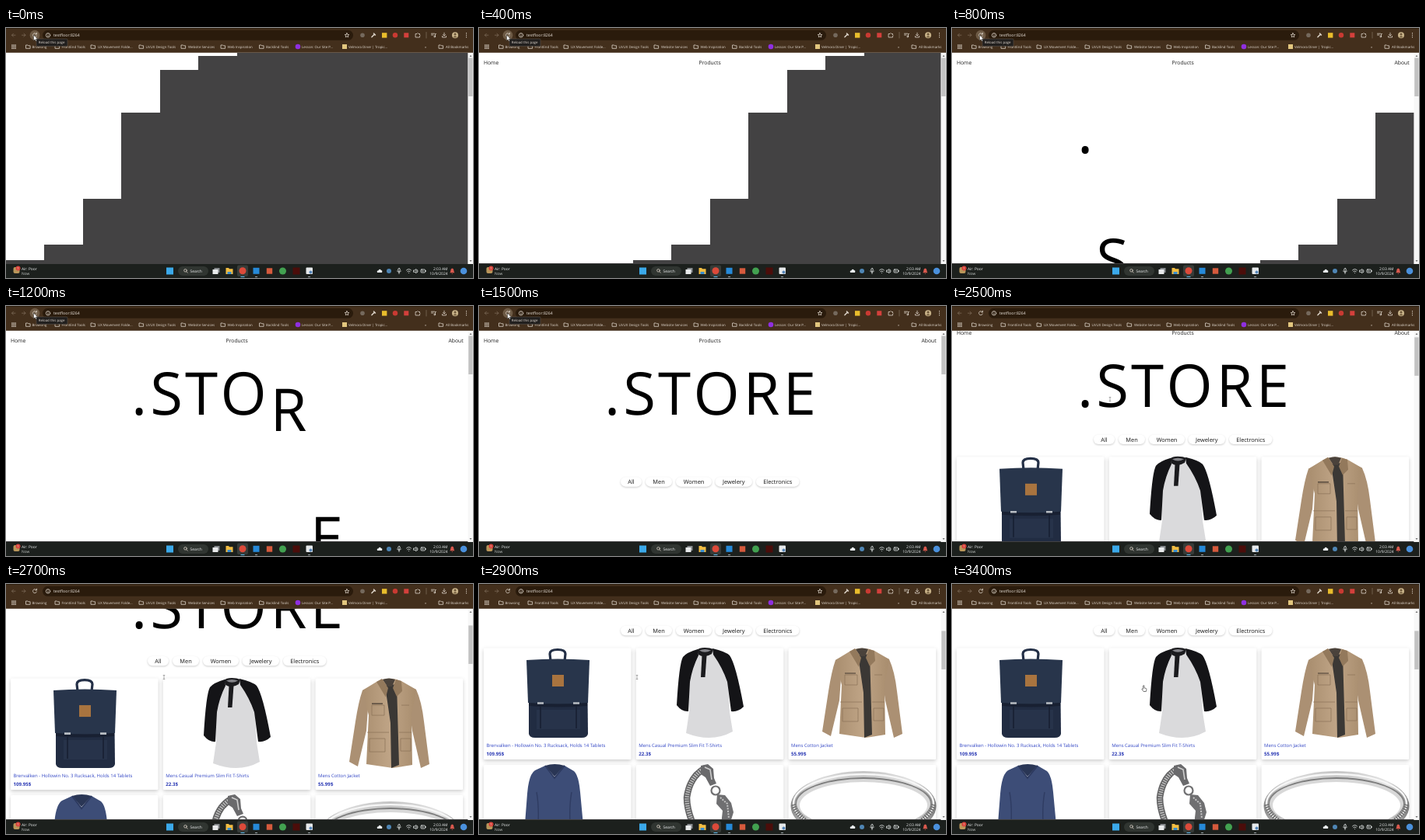
Recreate the animation shown at these times as an HTML page. Size 600x322 px, loop 3500 ms.

```html
<!DOCTYPE html>
<html lang="en">
<head>
<meta charset="utf-8">
<title>Store intro</title>
<style>
html, body { margin: 0; width: 100%; height: 100%; overflow: hidden; background: #fff; }
svg { display: block; width: 600px; height: 322px; }
text { font-family: "Open Sans", "Noto Sans", sans-serif; text-rendering: geometricPrecision; }
.line { fill: none; stroke: #dcd3c8; stroke-width: .8; stroke-linecap: round; stroke-linejoin: round; }
.dim { stroke: #7d6b58; }
.mark { font-size: 4.4px; fill: #e3dbd2; }
.nav { font-size: 6.8px; fill: #1c1c1c; }
.title { font-size: 76px; text-anchor: middle; }
.pill { fill: #fff; filter: drop-shadow(0 1.2px 1px rgba(0,0,0,.2)); }
.pill-text { font-size: 7.4px; text-anchor: middle; fill: #151515; }
.card { fill: #fff; filter: drop-shadow(0 2.4px 2.8px rgba(0,0,0,.2)); }
.name { font-size: 6px; fill: #3145c4; }
.price { font-size: 6.2px; font-weight: 700; fill: #2a39b4; }
.tray { font-size: 4.9px; fill: #f2f4f5; }
.tray.soft { fill: #c6cac8; }
.bars { fill: #434243; shape-rendering: crispEdges; }
</style>
</head>
<body>
<svg viewBox="0 0 600 322" xmlns="http://www.w3.org/2000/svg">
  <defs>
    <clipPath id="view"><rect y="31.6" width="593.6" height="272.400"/></clipPath>
    <linearGradient id="silver">
      <stop offset="0" stop-color="#8a8a8a"/><stop offset=".15" stop-color="#dedede"/>
      <stop offset=".5" stop-color="#c4c4c4"/><stop offset=".85" stop-color="#e4e4e4"/>
      <stop offset="1" stop-color="#777"/>
    </linearGradient>
    <linearGradient id="tan">
      <stop offset="0" stop-color="#a98e6f"/><stop offset=".5" stop-color="#bfa486"/>
      <stop offset="1" stop-color="#a88d6e"/>
    </linearGradient>
  </defs>
  <rect width="600" height="322" fill="#fff"/>

  <g clip-path="url(#view)">
    <g id="page">
      <g id="nav" class="nav">
        <text x="6" y="46.8">Home</text>
        <text x="282.6" y="46.8">Products</text>
        <text x="587.6" y="46.8" text-anchor="end">About</text>
      </g>
      <g id="title" class="title"></g>
      <g id="filters"></g>
      <g id="goods">
        <g id="cards"></g>
        <g transform="translate(0 122)">
          <!-- backpack -->
          <path d="M92 99L91 90Q91 84.500 101 84.500T111 90L110 99" fill="none" stroke="#243047" stroke-width="3.2"/>
          <path d="M64 99H139L140 193Q139 198 132 198H72Q65 198 64 193Z" fill="#212c42"/>
          <path d="M61 98Q101 95 142 98L140 153Q102 156 63 153Z" fill="#28354b"/>
          <path d="M64 153Q102 156 139 153V157Q102 160 64 157Z" fill="#182032"/>
          <path d="M74 162H130V187H74Z" fill="#27334a"/>
          <path d="M79 155V186M125 155V186" stroke="#172032" stroke-width="1.6"/>
          <path d="M75 153.500H83M121 153.500H129" stroke="#b9bec4" stroke-width="2.6"/>
          <rect x="94" y="117" width="15" height="15" fill="#a9743f"/>
          <!-- raglan shirt -->
          <path d="M279 88L301 86 318 100 320 130 322 165 326 190Q299 205 266 192L270 165 269 130 270 104Z" fill="#dadadc"/>
          <path d="M281 84Q267 88 262 94 257 103 254 156 261 165 269 164L271 126Q274 108 282 92Z" fill="#141417"/>
          <path d="M300 83Q317 87 322 92 330 103 340 158 333 165 324 164L319 126Q313 108 301 91Z" fill="#141417"/>
          <path d="M280 85Q283 82 290 82T301 84L299 90Q290 96 282 91Z" fill="#1b1b1e"/>
          <path d="M283 85.500Q290 90 298 85.500 290 82.500 283 85.500Z" fill="#85858a"/>
          <path d="M286.500 92H292.500L290.500 120H285Z" fill="#1b1b1e"/>
          <!-- jacket -->
          <path d="M472 91L458 98Q453 112 449 138L441 190 452 196 463 150 466 108Z" fill="#ab9073"/>
          <path d="M512 90L527 97Q534 112 537 138L544 193 533 198 522 150 516 108Z" fill="#ab9073"/>
          <path d="M476 87Q491 79 508 86L527 97 521 130 522 194 497 198 463 193 466 130 458 98Z" fill="url(#tan)"/>
          <path d="M487 92L502 90 505 194 495 198 494 140Z" fill="#3b3835"/>
          <path d="M476 87L483 83 491 95 488 107ZM501 84L508 86 509 99 502 106 497 95Z" fill="#93795c"/>
          <path d="M484 84Q492 81 500 84L496 93H490Z" fill="#4a423b"/>
          <g fill="none" stroke="#8a7156" stroke-width=".7">
            <path d="M470 117H486V130H470ZM467 160H487V177H467ZM507 160H520V176H507ZM508 117H518M464 152H492M505 152H521"/>
          </g>
          <path d="M470 115H484" stroke="#453a30" stroke-width="1.2"/>
          <!-- sweater -->
          <path d="M85 234L72 240Q64 245 62 270L58 322H135L130 268Q128 246 122 241L110 234 97 250Z" fill="#3d4d77"/>
          <path d="M85 234Q97 230 110 234L97 248Z" fill="#2a3655"/>
          <path d="M85 234L97 250 110 234" fill="none" stroke="#2d3a60" stroke-width="2"/>
          <path d="M74 268Q78 290 75 322M119 268Q115 290 118 322" fill="none" stroke="#2f3c62" stroke-width="1.4"/>
          <!-- chain bracelet -->
          <g fill="none">
            <path d="M291 237Q271 247 267 275 267 295 281 322" stroke="#626263" stroke-width="8.500"/>
            <path d="M291 237Q271 247 267 275 267 295 281 322" stroke="#bdbdbd" stroke-width="5.500" stroke-dasharray="1.500 1.500"/>
            <circle cx="304" cy="266" r="5.500" stroke="#707072" stroke-width="2.2"/>
          </g>
          <path d="M285 234L294 232 301 238 302 250 305 257 297 260 291 249 285 245Z" fill="#6a6a6c"/>
          <path d="M290 236L297 239 299 252" fill="none" stroke="#cfcfcf" stroke-width="1.600"/>
          <path d="M306 271L316 272 324 282 327 294 322 310 311 310 313 292 305 283Z" fill="#6f6f71"/>
          <path d="M310 275L319 283 321 302" fill="none" stroke="#c6c6c6" stroke-width="2" stroke-dasharray="2 1.500"/>
          <!-- ring -->
          <ellipse cx="494" cy="286" rx="93.500" ry="45" fill="url(#silver)"/>
          <ellipse cx="494" cy="283" rx="90" ry="38" fill="none" stroke="#f6f6f6" stroke-width="2.400"/>
          <ellipse cx="494" cy="282" rx="87" ry="33" fill="#7d7d7d"/>
          <ellipse cx="494" cy="283" rx="86" ry="32" fill="#d8d8d8"/>
          <ellipse cx="494" cy="285" rx="82" ry="30" fill="#fff"/>
          <path d="M404 284Q408 301 438 316M584 284Q580 301 550 316" fill="none" stroke="#707070" stroke-width="6" stroke-dasharray="1.600 1.400"/>
        </g>
      </g>
    </g>
    <g id="bars" class="bars"></g>
  </g>

  <!-- scrollbar -->
  <rect x="593.6" y="31.6" width="6.400" height="272.400" fill="#f7f7f7"/>
  <path d="M595.500 37L597 34.800 598.500 37ZM595.500 299L597 301.200 598.500 299Z" fill="#777"/>
  <rect id="thumb" x="594.2" y="38.500" width="5.300" height="49.500" fill="#c2c2c2"/>

  <!-- browser bars -->
  <rect width="600" height="31.8" fill="#432f1c"/>
  <rect width="600" height="1" fill="#2d1e0e"/>
  <rect x="47" y="2.800" width="399" height="13" rx="6.500" fill="#2a1b0c"/>
  <g class="line">
    <path class="dim" d="M12 9.200H7.500M9.500 7.200L7.500 9.200 9.500 11.200M20.500 9.200H25M23 7.200L25 9.200 23 11.200"/>
    <circle id="hover" cx="37" cy="9.200" r="6.400" fill="#6d5a45" stroke="none"/>
    <path d="M39 7.600A2.500 2.500 0 1 0 39.400 10M39.500 6.200V8H37.700"/>
    <circle cx="54" cy="9.300" r="2.700"/><path d="M54 9.200V10.700M54 7.800V7.900"/>
    <path d="M438 6.600L438.800 8.400 440.800 8.600 439.300 9.900 439.700 11.800 438 10.800 436.300 11.800 436.700 9.900 435.200 8.600 437.200 8.400Z"/>
    <path d="M470 11.600L473.500 8M472.500 7L474.500 9" stroke-width="1.500"/>
    <path d="M526.500 7.500H528Q529 5.500 530 7.500H531.500V9Q533 9.700 531.500 10.500V12H526.500Z"/>
    <path class="dim" d="M540 5.500V13"/>
    <path d="M546.500 7.200H550.500M546.500 9H549M551.500 11V7.500H552.500"/><circle cx="550.700" cy="11" r=".9"/>
    <path d="M563 6.200V10M561.400 8.500L563 10.100 564.600 8.500M560.500 10.500V12H565.500V10.500"/>
    <path d="M591.500 6.700V6.800M591.500 9.200V9.300M591.500 11.700V11.800" stroke-width="1.200"/>
  </g>
  <circle cx="458" cy="9.300" r="2.800" fill="#75695d"/>
  <rect x="483" y="6.200" width="6.400" height="6.400" fill="#e9bd2c"/>
  <circle cx="500" cy="9.300" r="3.200" fill="#c93a32"/>
  <rect x="511.300" y="6.300" width="6" height="6" fill="#d4403c"/>
  <circle cx="577" cy="9.300" r="4" fill="#c9b48a"/>
  <path d="M574.500 12.200Q577 8.500 579.500 12.200Z" fill="#6d5638"/><circle cx="577" cy="8" r="1.500" fill="#6d5638"/>
  <text x="61" y="11.200" font-size="5.200" fill="#eee7df">testfloor:8264</text>
  <g id="grid" fill="#dcd3c8"></g>
  <g id="marks" class="mark"></g>
  <circle cx="375" cy="24" r="3.300" fill="#8f2fe0"/>
  <rect x="432" y="21" width="6" height="6" fill="#e2c67e"/>
  <g id="tip">
    <rect x="39" y="14" width="40" height="9.400" rx="1" fill="#211f1e" stroke="#6f655b" stroke-width=".4"/>
    <text x="41.700" y="20.200" class="mark">Reload this page</text>
  </g>

  <!-- taskbar -->
  <rect y="304" width="600" height="18" fill="#1c201d"/>
  <rect x="9.500" y="308" width="8" height="8" rx="2" fill="#b9965a"/>
  <circle cx="15.500" cy="309.500" r="3" fill="#d8443c"/>
  <text x="15.500" y="311" text-anchor="middle" font-size="4" fill="#fff">1</text>
  <text class="tray" x="20" y="311.600">Air: Poor</text>
  <text class="tray soft" x="20" y="317.900">Now</text>
  <rect x="206" y="308.500" width="9" height="9" fill="#3ba9ea"/>
  <rect x="221" y="307" width="39" height="12" rx="6" fill="#303531"/>
  <g class="line"><circle cx="230.500" cy="312.300" r="1.800"/><path d="M231.800 313.700L233.300 315.200"/></g>
  <text class="tray" x="236.500" y="314.800">Search</text>
  <rect x="267.500" y="309" width="7" height="6" fill="#85898c"/><rect x="265.500" y="311" width="7" height="6" fill="#e8eaeb"/>
  <path d="M282.500 309H286L287 310.200H291.500V317H282.500Z" fill="#f2bd42"/><rect x="284.500" y="314" width="5" height="3" fill="#3a8fd0"/>
  <rect x="297" y="305.500" width="14" height="14.500" rx="2" fill="#373c39"/>
  <circle cx="304" cy="312.800" r="4.500" fill="#dc4a3a"/>
  <rect x="317.500" y="308.800" width="8" height="8" fill="#2689d8"/>
  <rect x="334.800" y="309.300" width="7.400" height="7.400" fill="#d65a3c"/>
  <circle cx="355.500" cy="313" r="4.500" fill="#42a150"/>
  <rect x="368.500" y="308.500" width="9" height="9" fill="#4b0d0a"/>
  <rect x="385.500" y="308.500" width="8.500" height="8.500" rx="1" fill="#e6e9eb"/><circle cx="391.500" cy="314.500" r="2" fill="#5786b8"/>
  <path d="M301.500 320.500H306.500" stroke="#58b8ee"/><path d="M320 320.500H323M388 320.500H391" stroke="#9aa3a8"/>
  <path d="M477 315Q476 312.500 478.500 312.300 480 309.500 482 312 484 312.200 483 315Z" fill="#e9edef"/>
  <circle cx="492" cy="313" r="3" fill="#4f86b5"/>
  <g class="line" style="stroke:#eef1f2">
    <rect x="503.800" y="309.500" width="2.400" height="4" rx="1.200"/><path d="M502.500 313Q505 316.500 507.500 313M505 315V316.500"/>
    <path d="M514.500 312Q517.500 309 520.500 312M515.800 313.700Q517.500 312 519.200 313.700M517.500 315.500V315.600"/>
    <path d="M524 312H525.300L527 310.500V315.800L525.300 314.300H524ZM528.500 311.500Q529.800 313 528.500 314.800"/>
    <rect x="533" y="311" width="5.500" height="4" rx="1"/><path d="M539.300 312.500V313.500M534.500 313H536.500"/>
  </g>
  <text class="tray" x="567.500" y="311.600" text-anchor="end">2:03 AM</text>
  <text class="tray" x="567.500" y="317.900" text-anchor="end">10/9/2024</text>
  <path d="M570.300 315.200Q571.300 314 571.300 312 571.500 309.500 573.300 309.500T575.300 312Q575.300 314 576.300 315.200ZM572.500 316H574.100L573.300 317Z" fill="#d9594e"/>
  <circle cx="588" cy="313" r="4.300" fill="#4a90dc"/>

  <g id="cursor">
    <path id="arrow" d="M0 0V7.200L1.700 5.700 2.800 8.100 4 7.600 2.900 5.200H5.100Z" fill="#fff" stroke="#222" stroke-width=".5"/>
    <path id="beam" d="M-1.300 -2.500H1.300M0 -2.500V2.500M-1.300 2.500H1.300" fill="none" stroke="#555" stroke-width=".5"/>
    <path id="hand" d="M-.9 -3.500Q0 -4.500 .5 -3.500V-.6L2.900 0Q3.600 .4 3.400 1.500L2.800 4H-.4L-2.600 1Q-2.600 -.2 -.9 .8Z" fill="#fff" stroke="#222" stroke-width=".6"/>
  </g>
</svg>

<script>
const LOOP = 3500, STEP = 100, VIEW_TOP = 31.8, VIEW_H = 271.5, COL_W = 49.47;
const $ = id => document.getElementById(id);
const clamp = x => Math.min(1, Math.max(0, x));
const quint = x => (x = clamp(x), x < .5 ? 16 * x ** 5 : 1 - 16 * (1 - x) ** 5);
const smooth = x => (x = clamp(x), x * x * (3 - 2 * x));
const lerp = (a, b, p) => a + (b - a) * p;
const shift = (el, x, y) => el.setAttribute('transform', `translate(${x.toFixed(2)} ${y.toFixed(2)})`);
const show = (el, on) => el.setAttribute('visibility', on ? 'visible' : 'hidden');

function add(parent, tag, attrs, text = '') {
  const el = document.createElementNS('http://www.w3.org/2000/svg', tag);
  for (const key in attrs) el.setAttribute(key, attrs[key]);
  el.textContent = text;
  return $(parent).appendChild(el);
}

// Bookmarks
for (let i = 0; i < 9; i++)
  add('grid', 'rect', { x: 7.2 + i % 3 * 2.1, y: 21.4 + Math.floor(i / 3) * 2.1, width: 1.4, height: 1.4 });
const folder = x => add('marks', 'path', {
  class: 'line', d: `M${x - 2.6} 22H${x - .5}L${x + .3} 22.800H${x + 2.6}V26.300H${x - 2.6}Z`
});
[
  [33.5, 'Browsing', 28.5], [71.5, 'FrontEnd Tools', 66], [118, 'UX Movement Folde...', 112],
  [179.5, 'UI/UX Design Tools', 174], [234, 'Website Services', 228], [284.5, 'Web Inspiration', 279],
  [334, 'BackEnd Tools', 328.5], [380, 'Lesson: Our Site P...'], [440, 'Velmora Diner | Tropic...'],
  [538, '»'], [565, 'All Bookmarks', 559]
].forEach(([x, label, icon]) => {
  if (icon) folder(icon);
  add('marks', 'text', { x, y: 25.6 }, label);
});

// Page content
const letters = [['.', 171], ['S', 206], ['T', 251], ['O', 305], ['R', 363], ['E', 412]]
  .map(([c, x]) => add('title', 'text', { x, y: 140 }, c));

[['All', 182, 27], ['Men', 214, 34], ['Women', 253, 46], ['Jewelery', 303.5, 47.5], ['Electronics', 356, 55.5]]
  .forEach(([label, x, width]) => {
    add('filters', 'rect', { class: 'pill', x, y: 175.8, width, height: 12.4, rx: 6.2 });
    add('filters', 'text', { class: 'pill-text', x: x + width / 2, y: 184.9 }, label);
  });

[
  ['Brenvalken - Hollowin No. 3 Rucksack, Holds 14 Tablets', '109.95$'],
  ['Mens Casual Premium Slim Fit T-Shirts', '22.3$'],
  ['Mens Cotton Jacket', '55.99$']
].forEach(([name, price], i) => {
  const x = 6 + 195.8 * i;
  for (const y of [204.5, 355])
    add('cards', 'rect', { class: 'card', x, y, width: 189.5, height: 143.5, rx: 1.5 });
  add('cards', 'text', { class: 'name', x: x + 3.4, y: 331.6 }, name);
  add('cards', 'text', { class: 'price', x: x + 3.4, y: 342.6 }, price);
});

const bars = Array.from({ length: 12 }, (_, i) =>
  add('bars', 'rect', { x: i * COL_W, width: COL_W + .1, height: VIEW_H + 1 }));

function moveCursor(t) {
  const drift = smooth((t - 1.3) / .5);
  const out = smooth((t - 1.9) / .45), right = smooth((t - 2.95) / .4);
  const x = lerp(lerp(lerp(35.5, 38.5, drift), 203, out), 246.5, right);
  const y = lerp(lerp(lerp(9, 9.5, drift), 120, out), 134.5, right);
  shift($('cursor'), x, y);
  show($('arrow'), t < 2.25);
  show($('beam'), t >= 2.25 && t < 3);
  show($('hand'), t >= 3);
  show($('tip'), t < 1.95);
  show($('hover'), t < 1.95);
}

// t in seconds
function render(t) {
  bars.forEach((bar, i) => bar.setAttribute('y', VIEW_TOP + VIEW_H * quint(.7466 + t - .1 * i)));
  letters.forEach((el, i) => shift(el, 0, VIEW_H * (1 - quint((t - .472 - .1 * i) / .5))));
  shift($('nav'), 0, -27 * (1 - quint(t / .38)));
  shift($('filters'), 0, VIEW_H * (1 - quint((t - 1.2) / .5)));
  shift($('goods'), 0, VIEW_H * (1 - quint((t - 1.3) / .5)));
  const scroll = 122 * smooth((t - 2.42) / .45);
  shift($('page'), 0, -scroll);
  shift($('thumb'), 0, scroll * .18);
  moveCursor(t);
}

// The picture holds for one step at a time
const start = performance.now();
let last = -1;
function tick() {
  const step = Math.floor((performance.now() - start) % LOOP / STEP);
  if (step !== last) render((last = step) * STEP / 1000);
  requestAnimationFrame(tick);
}
tick();
</script>
</body>
</html>
```
